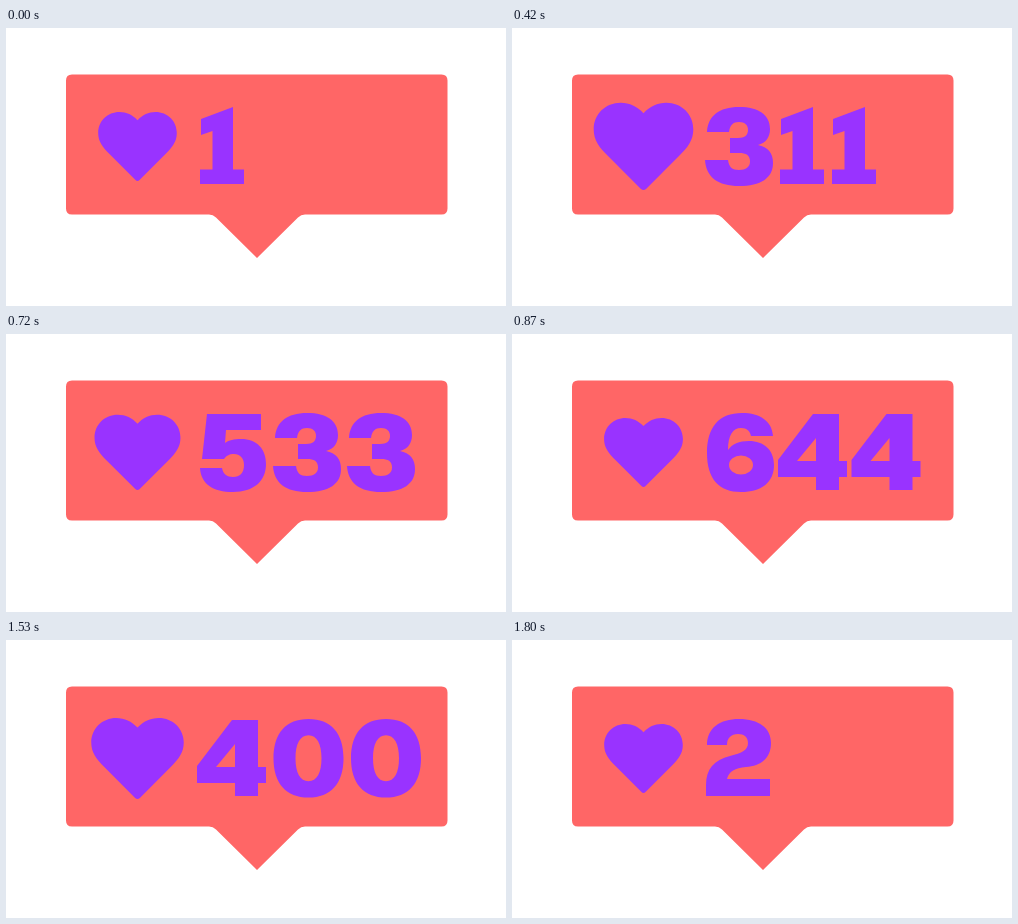
An HTML page with a canvas for the animation above (1830 ms loop, 500 by 278 pixels).

```html
<!DOCTYPE html>
<html lang="en">
<head>
<meta charset="utf-8">
<title>Like counter</title>
<style>
  html, body { margin: 0; width: 100%; height: 100%; overflow: hidden; background: #fff; }
  canvas { display: block; }
</style>
</head>
<body>
<canvas id="stage" width="500" height="278" role="img" aria-label="Like counter"></canvas>
<script>
const ctx = document.getElementById('stage').getContext('2d');
const CORAL = '#ff6666', VIOLET = '#9933ff';
const STEP = 30, STEPS = 61;

const bubble = new Path2D('M66 46.5H435.5Q441.5 46.5 441.5 52.5V180.5Q441.5 186.5 435.5 186.5H299' +
  'Q295 186.5 292 189.5L251 230L210 189.5Q207 186.5 203 186.5H66Q60 186.5 60 180.5V52.5Q60 46.5 66 46.5Z');

// Centred on its own origin
const heart = new Path2D('M0-26.3C-5-31.6-11-34.5-18-34.5C-30-34.5-39.3-25.5-39.3-13.5' +
  'C-39.3-5-35 .5-28 7.5L-2 33.5Q0 35.3 2 33.5L28 7.5C35 .5 39.3-5 39.3-13.5' +
  'C39.3-25.5 30-34.5 18-34.5C11-34.5 5-31.6 0-26.3Z');

const oval = (x, y, rx, ry) =>
  `M${x - rx} ${y}a${rx} ${ry} 0 1 0 ${2 * rx} 0a${rx} ${ry} 0 1 0 ${-2 * rx} 0Z`;

// Squarish ring curve; k sets how full its corners are
function squircle(x, y, rx, ry, k) {
  const l = x - rx, r = x + rx, t = y - ry, b = y + ry, h = rx * k, v = ry * k;
  return `M${x} ${t}C${x + h} ${t} ${r} ${y - v} ${r} ${y}C${r} ${y + v} ${x + h} ${b} ${x} ${b}` +
    `C${x - h} ${b} ${l} ${y + v} ${l} ${y}C${l} ${y - v} ${x - h} ${t} ${x} ${t}Z`;
}

const six = 'M71 23C70 8 58 0 40 0C17 0 5 14 5 40C5 66 17 79 39 79C60 79 72 69 72 52' +
  'C72 37 62 28 47 28C37 28 30 31 26 37C26 22 31 15 39 15C45 15 48 18 49 23Z' + oval(39, 52, 12, 9.5);

const glyphs = [
  [77.5, squircle(39, 39.3, 35, 39.3, 0.64) + squircle(39, 39.3, 13, 23, 0.64)],
  [52, 'M37 0L5 12V28L16.5 24V62.5H4V77H48V62.5H37Z'],
  [73, 'M5 26C5 9 18 0 37 0C57 0 69 9 69 24C69 39 59 47 44 48C33 49 27 52 25 60H68V77H4V66' +
    'C4 50 12 41 28 37C40 34 46 31 46 24C46 18 42 15 36 15C29 15 25 19 25 26Z'],
  [74, 'M5 25C6 9 17 0 37 0C57 0 68 8 68 22C68 30 64 36 56 38C66 40 71 46 71 56C71 71 59 79 37 79' +
    'C16 79 4 70 3 53H26C27 60 30 63 37 63C44 63 48 60 48 54.5C48 48 44 46 37 46H28V31H36' +
    'C43 31 46 28 46 23C46 18 43 15 37 15C31 15 28 18 27 25Z'],
  [73.5, 'M36 1H62V48H70V64H62V77H39V64H1V47ZM39 25L20 48H39Z'],
  [74, 'M11 1H65V17H30L29 30C33 27 38 26 45 26C61 26 70 36 70 51C70 68 58 79 37 79C17 79 5 71 4 55H26' +
    'C27 61 31 64 37 64C44 64 48 60 48 52C48 45 44 41 38 41C33 41 30 43 28 46H6Z'],
  [75, six],
  [70, 'M4 1H68V17C52 32 42 50 40 77H15C18 52 27 34 42 19H4Z'],
  [77, 'M38.5 0C58 0 70 8 70 21C70 30 66 35 58 38C68 41 73 47 73 56C73 71 60 79 38.5 79' +
    'C17 79 4 71 4 56C4 47 9 41 19 38C11 35 7 30 7 21C7 8 19 0 38.5 0Z' +
    oval(38.5, 23, 10.5, 8) + oval(38.5, 55, 12, 9)],
  [76, six]
].map(([advance, d]) => ({ advance, path: new Path2D(d) }));

const nine = new Path2D();
nine.addPath(glyphs[6].path, new DOMMatrix([-1, 0, 0, -1, 77, 79]));
glyphs[9].path = nine;

// Climb to 666, hold, then drop twice as fast
function count(n) {
  if (n < 45) return Math.min(666, Math.floor(1 + 22.2 * n));
  return Math.round(2 + 664 * (60 - n) / 15);
}

function fillAt(path, x, y, color, scale = 1) {
  ctx.setTransform(scale, 0, 0, scale, x, y);
  ctx.fillStyle = color;
  ctx.fill(path, 'evenodd');
}

const start = performance.now();

function draw() {
  const n = Math.floor((performance.now() - start) / STEP) % STEPS;
  ctx.setTransform(1, 0, 0, 1, 0, 0);
  ctx.clearRect(0, 0, 500, 278);
  fillAt(bubble, 0, 0, CORAL);

  const pulse = (1 - Math.cos(n / 30 * 2 * Math.PI)) / 2;
  fillAt(heart, 131.5, 118.5, VIOLET, 1 + 0.27 * pulse);

  let x = 190;
  for (const digit of String(count(n))) {
    const { advance, path } = glyphs[digit];
    fillAt(path, x, 79, VIOLET);
    x += advance;
  }
  requestAnimationFrame(draw);
}
draw();
</script>
</body>
</html>
```
